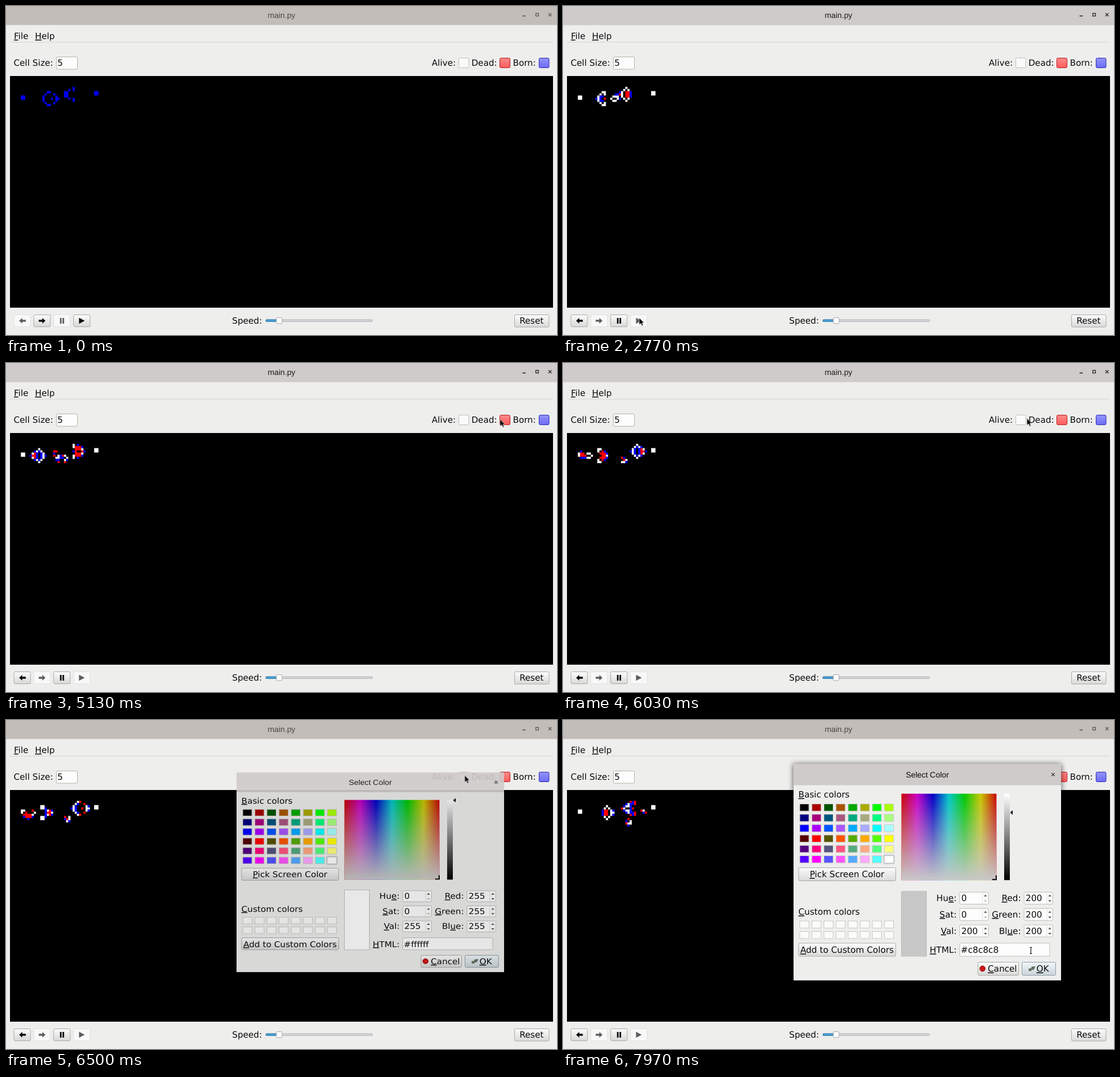
An HTML page for the animation above (8000 ms loop, 968 px wide and 578 px high).

```html
<!DOCTYPE html>
<html lang="en">
<head>
<meta charset="utf-8">
<title>main.py</title>
<style>
  html, body { margin: 0; width: 100%; height: 100%; overflow: hidden; background: #eeeeed; }
  svg { display: block; width: 968px; height: 578px; }
  text { font: 15.13px "DejaVu Sans", sans-serif; fill: #0a0a0a; white-space: pre; text-rendering: geometricPrecision; }
  text.caption { font: 13.9px "Liberation Sans", sans-serif; text-anchor: middle; }
  .underline { text-decoration: underline; text-decoration-thickness: 1px; }
</style>
</head>
<body>
<svg id="stage" viewBox="0 0 968 578">
  <defs>
    <linearGradient id="button" x2="0" y2="1"><stop stop-color="#fcfcfc"/><stop offset="1" stop-color="#d9d9d8"/></linearGradient>
    <linearGradient id="okButton" x2="0" y2="1"><stop stop-color="#f1f6f8"/><stop offset="1" stop-color="#c9d5da"/></linearGradient>
    <linearGradient id="red" x2="0" y2="1"><stop stop-color="#ff8a8a"/><stop offset="1" stop-color="#ff5c5c"/></linearGradient>
    <linearGradient id="blue" x2="0" y2="1"><stop stop-color="#9494ff"/><stop offset="1" stop-color="#6c6cf4"/></linearGradient>
    <linearGradient id="hue"></linearGradient>
    <linearGradient id="fade" x2="0" y2="1"><stop stop-color="#c8c8c8" stop-opacity="0"/><stop offset="1" stop-color="#c8c8c8"/></linearGradient>
    <linearGradient id="value" x2="0" y2="1"><stop stop-color="#fff"/><stop offset="1"/></linearGradient>
    <filter id="shadow" x="-6%" y="-6%" width="112%" height="114%"><feGaussianBlur stdDeviation="5"/></filter>
  </defs>
</svg>
<script>
const LOOP = 8000, RUN_AT = 2130, FIRST_TICK = 2155, TICK = 204, OPEN_AT = 6370, OPEN_MS = 160, PICK_AT = 7250;
const INK = '#0a0a0a', FACE = '#eeeeed', EDGE = '#a9a9a6', SOFT = '#bfbfb6', ACTIVE = '#cfcbca', INACTIVE = '#c3bdba';
const stage = document.getElementById('stage');

// ---- drawing helpers ----
let layer = stage;
function add(tag, attrs, parent = layer) {
  const el = document.createElementNS('http://www.w3.org/2000/svg', tag);
  for (const key in attrs) el.setAttribute(key, attrs[key]);
  return parent.appendChild(el);
}
function group(draw) {
  const outer = layer, g = add('g', {});
  layer = g;
  draw();
  layer = outer;
  return g;
}
const fillRect = (x, y, width, height, fill) => add('rect', { x, y, width, height, fill });
const box = (x, y, w, h, fill, stroke, rx = 2) =>
  add('rect', { x: x + .5, y: y + .5, width: w - 1, height: h - 1, fill, stroke, rx });
const shape = (d, fill = INK) => add('path', { d, fill });
const line = (d, stroke = INK, width = 1) => add('path', { d, stroke, 'stroke-width': width, fill: 'none' });

// "&" marks the underlined mnemonic letter
function label(x, y, str, anchor = 'start') {
  const el = add('text', { x, y, 'text-anchor': anchor });
  const at = str.indexOf('&');
  if (at < 0) el.textContent = str;
  else {
    el.append(str.slice(0, at));
    add('tspan', { class: 'underline' }, el).textContent = str[at + 1];
    el.append(str.slice(at + 2));
  }
  return el;
}
function caption(x, y, str) {
  const el = add('text', { x, y, class: 'caption' });
  el.textContent = str;
  return el;
}
const button = (x, y, w, h, enabled = true) =>
  box(x, y, w, h, enabled ? 'url(#button)' : '#f8f8f8', enabled ? EDGE : '#e2e2df');
const cross = (x, y, color) =>
  line(`M${x - 2.7} ${y - 2.7}l5.4 5.4m0 -5.4l-5.4 5.4`, color, 1.3);

// ---- main window ----
fillRect(0, 0, 968, 578, FACE);
const titleBar = fillRect(0, 0, 968, 33, INACTIVE);
line('M0 33.5H968', '#dcd9d7');
const titleText = caption(484, 20.5, 'main.py');
const windowButtons = group(() => {
  line('M907.5 17.5h5.5', 'currentColor', 1.6);
  line('M930.8 12.8h4.6v4.8h-4.6z', 'currentColor', 1.3);
  cross(955.7, 15.3, 'currentColor');
});
label(14, 58, '&File');
label(51, 58, '&Help');
line('M7 63.5H961', '#d6d6cd');
label(13.5, 105.4, 'Cell Size:');
box(88, 89, 38, 22.5, '#fdfdfd', '#b4b4a6');
label(90.3, 105.4, '5');
label(748, 105.4, 'Alive:');
label(817.7, 105.4, 'Dead:');
label(890.5, 105.4, 'Born:');
box(795, 91, 18.5, 18, '#fafafa', SOFT);
box(867, 91, 19, 18, 'url(#red)', '#b81c1c');
box(936, 91, 18.5, 18, 'url(#blue)', '#2a2ab4');
fillRect(7, 123, 954, 407, '#000');

const cellLayers = ['#f00', '#fff', '#00f'].map(fill => add('path', { fill }));

function transport(running) {
  const ink = enabled => enabled ? INK : '#5e5e5e';
  [running, !running, running, !running].forEach((on, i) => button(13.5 + 34.9 * i, 542, 30, 22, on));
  shape('M23 553l5.5 -5v3.2h6.3v3.6h-6.3v3.2z', ink(running));
  shape('M69.3 553l-5.5 -5v3.2h-6.3v3.6h6.3v3.2z', ink(!running));
  shape('M94.8 548h2.8v10h-2.8zM99.3 548h2.8v10h-2.8z', ink(running));
  shape('M128.3 547.8l10 5.2l-10 5.2z', ink(!running));
}
const stopped = group(() => transport(false));
const running = group(() => transport(true));
label(397.3, 558.4, 'Speed:');
box(456, 550.5, 188.5, 4.5, '#d3d3d8', '#b5b5ba', 1.5);
box(456, 550.5, 24, 4.5, '#4aa0d4', '#2f7fb3', 1.5);
box(474.5, 547, 11, 11.5, '#fbfbfb', '#a9a9a9');
button(893, 542, 61.5, 22.5);
label(902.2, 558.4, 'Reset');

// ---- colour dialog ----
const HUES = ['#c80000', '#c800c8', '#0000c8', '#00c8c8', '#00c800', '#c8c800', '#c80000'];
HUES.forEach((color, i) => add('stop', { offset: i / 6, 'stop-color': color }, document.getElementById('hue')));

const swatch = (col, y, fill) => box(415.5 + 21.25 * col, y, 17, 13.5, fill, '#c9c9c2', 0);
function spin(x, y, name, value, right) {
  label(right, y + 16.2, name, 'end');
  box(x, y, 51.5, 22, '#fdfdfd', SOFT);
  line(`M${x + 40.5} ${y + 1}v20`, '#dedede');
  shape(`M${x + 43} ${y + 8}l2.7 -3.3l2.7 3.3z`, '#555');
  shape(`M${x + 43} ${y + 14.5}l2.7 3.3l2.7 -3.3z`, value === '0' ? '#bbb' : '#555');
  return label(x + 3.3, y + 16.2, value);
}

let preview, valueArrow, valueTexts, htmlText, dialogShadow;
const dialog = group(() => {
  dialogShadow = add('rect', { x: 404, y: 77, width: 472, height: 383, fill: '#000', opacity: .55, filter: 'url(#shadow)' });
  fillRect(405, 77, 470, 380.5, FACE);
  fillRect(405, 77, 470, 37, ACTIVE);
  line('M405 114.5H875', '#dcd9d7');
  caption(640, 101, 'Select Color');
  cross(861, 95.8, '#333');

  label(413.5, 136.4, '&Basic colors');
  for (let i = 0; i < 48; i++) {
    const r = Math.floor(i / 3) % 4 * 85, g = Math.floor(i / 12) * 85, b = i % 3 * 127.5;
    swatch(Math.floor(i / 6), 147 + 18.2 * (i % 6), `rgb(${r},${g},${b})`);
  }
  box(562.5, 236.5, 20, 16.5, 'none', '#a8b8c0');
  button(413.5, 259, 171.5, 24);
  label(499, 276.4, '&Pick Screen Color', 'middle');
  label(413.5, 342.4, '&Custom colors');
  for (let i = 0; i < 16; i++) swatch(i % 8, i < 8 ? 352.5 : 371, '#fbfbfb');
  button(413.5, 391.5, 171.5, 24);
  label(499, 409.4, '&Add to Custom Colors', 'middle');

  for (const paint of ['hue', 'fade']) fillRect(594.5, 129.5, 167, 151.8, `url(#${paint})`);
  line('M754 280.2H762M761 273V281.2', INK, 2);
  fillRect(775, 129.5, 10, 151.8, 'url(#value)');
  valueArrow = shape('M785.5 0l4.5 -4v8z');
  preview = box(594, 300.5, 45, 115, '#fff', SOFT, 0);

  spin(696.5, 302, 'Hu&e:', '0', 691.5);
  spin(696.5, 330.7, '&Sat:', '0', 691.5);
  valueTexts = [
    spin(696.5, 359.5, '&Val:', '255', 691.5),
    spin(809.5, 302, '&Red:', '255', 804.5),
    spin(809.5, 330.7, '&Green:', '255', 804.5),
    spin(809.5, 359.5, 'Bl&ue:', '255', 804.5)
  ];
  label(691.5, 409.4, '&HTML:', 'end');
  box(696.5, 391.5, 159, 24, '#fdfdfd', SOFT);
  htmlText = label(698.8, 409.4, '#ffffff');

  button(728.5, 425, 72.5, 24);
  add('circle', { cx: 737, cy: 436.8, r: 4.8, fill: '#d01818', stroke: '#8c1010' });
  label(746.3, 442.4, '&Cancel');
  box(806, 425, 60, 24, 'url(#okButton)', '#8c9ba2');
  shape('M818 441v-4.5h3.5l2.5 -3.5h6l-3 6h-4v2z', '#687060');
  label(831.8, 442.4, '&OK');
});

// ---- pointer ----
const arrow = add('path', {
  d: 'M0 0V12L2.8 9.5L4.8 13.8L6.8 12.9L4.9 8.7H8.4Z', fill: '#0c0c0c', stroke: '#ddd', 'stroke-width': .6
});
const beam = line('M-2 -5.5H-.6L0 -5L.6 -5.5H2M0 -5V5M-2 5.5H-.6L0 5L.6 5.5H2', '#111', 1.2);

const PATH = [
  [30, 976, 330], [830, 490, 478], [1480, 141, 549], [1700, 140, 550], [1870, 134, 548], [2900, 134, 548],
  [3630, 783, 134], [3770, 850, 110], [3870, 914, 88], [4100, 930, 68], [4350, 947, 92],
  [4620, 926, 94], [5100, 868, 99], [5500, 868, 99], [6200, 806, 97], [6480, 806, 97],
  [6990, 792, 166], [7200, 786, 162], [7330, 786, 162], [7900, 822, 405]
];
function pointerAt(t) {
  const next = PATH.findIndex(p => p[0] > t);
  if (next === 0) return [-50, -50];
  if (next < 0) return PATH[PATH.length - 1].slice(1);
  const [t0, x0, y0] = PATH[next - 1], [t1, x1, y1] = PATH[next];
  let k = (t - t0) / (t1 - t0);
  k = k * k * (3 - 2 * k);
  return [x0 + (x1 - x0) * k, y0 + (y1 - y0) * k];
}

// ---- Game of Life ----
const GUN = `
........................O
......................O.O
............OO......OO............OO
...........O...O....OO............OO
OO........O.....O...OO
OO........O...O.OO....O.O
..........O.....O.......O
...........O...O
............OO`.trim().split('\n');
const COLS = 60, PITCH = 3.787, ORIGIN_X = 7.2, ORIGIN_Y = 123.1;

function nextGeneration(cells) {
  const counts = new Map();
  for (const c of cells)
    for (const dy of [-COLS, 0, COLS])
      for (const dx of [-1, 0, 1])
        if (dx || dy) counts.set(c + dx + dy, (counts.get(c + dx + dy) || 0) + 1);
  return new Set([...counts].filter(([c, n]) => n === 3 || n === 2 && cells.has(c)).map(([c]) => c));
}
function cellPath(cells) {
  return cells.map(c => {
    const x = ORIGIN_X + c % COLS * PITCH, y = ORIGIN_Y + Math.floor(c / COLS) * PITCH;
    return `M${x} ${y}H${x + PITCH}V${y + PITCH}H${x}Z`;
  }).join('');
}
const generations = [];
let before = new Set(), now = new Set();
GUN.forEach((row, y) => [...row].forEach((ch, x) => { if (ch === 'O') now.add((y + 5) * COLS + x + 5); }));
while (FIRST_TICK + generations.length * TICK < LOOP) {
  generations.push([
    [...before].filter(c => !now.has(c)),
    [...now].filter(c => before.has(c)),
    [...now].filter(c => !before.has(c))
  ].map(cellPath));
  before = now;
  now = nextGeneration(now);
}

// ---- playback ----
const show = (el, on) => el.setAttribute('display', on ? 'inline' : 'none');
let shown = -1;
function render(t) {
  const gen = Math.max(0, Math.floor((t - FIRST_TICK) / TICK));
  if (gen !== shown) cellLayers.forEach((path, i) => path.setAttribute('d', generations[gen][i]));
  shown = gen;

  const started = t >= RUN_AT, focused = started && t < OPEN_AT;
  show(stopped, !started);
  show(running, started);
  titleBar.setAttribute('fill', focused ? ACTIVE : INACTIVE);
  titleText.style.fill = focused ? '#1c1c1c' : '#484848';
  windowButtons.style.color = focused ? '#222' : '#555';

  const open = Math.min(1, (t - OPEN_AT) / OPEN_MS);
  show(dialog, open >= 0);
  show(dialogShadow, open === 1);
  dialog.setAttribute('transform', `translate(0 270) scale(1 ${.57 + .43 * open}) translate(0 -270)`);
  dialog.style.opacity = .5 + .5 * open;

  const value = t < PICK_AT ? 255 : 200;
  const hex = '#' + value.toString(16).repeat(3);
  valueTexts.forEach(el => { el.textContent = value; });
  htmlText.textContent = hex;
  preview.setAttribute('fill', hex);
  valueArrow.setAttribute('transform', `translate(0 ${130 + (255 - value) * .59})`);

  const [x, y] = pointerAt(t), typing = t > PICK_AT && y > 391;
  for (const el of [arrow, beam]) el.setAttribute('transform', `translate(${x} ${y})`);
  show(arrow, !typing);
  show(beam, typing);
}
const start = performance.now();
function frame() {
  render((performance.now() - start) % LOOP);
  requestAnimationFrame(frame);
}
frame();
</script>
</body>
</html>
```
